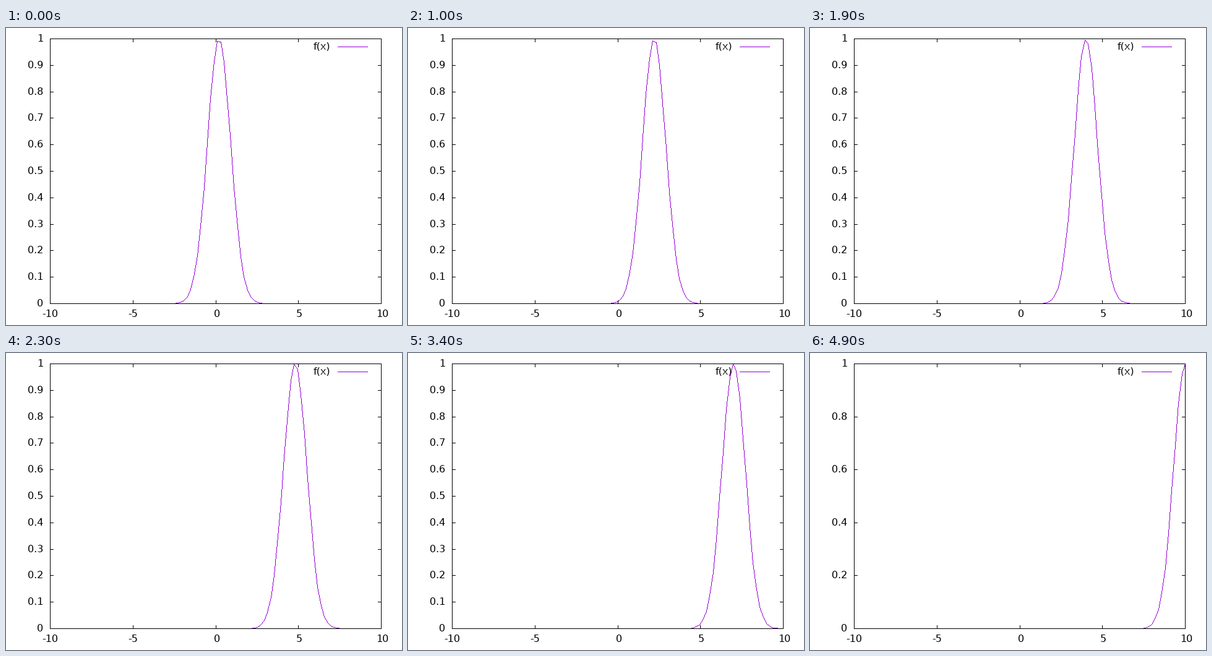
Write a matplotlib script that moves like this. It is 640 px wide and 480 px high and loops after 5 s.

```python
import matplotlib.pyplot as plt
import numpy as np
from matplotlib.animation import FuncAnimation
from matplotlib.collections import PolyCollection

WIDTH, HEIGHT, DPI = 640, 480, 100
LEFT, RIGHT, TOP, BOTTOM = 71, 606, 17, 445
FRAMES, INTERVAL = 50, 100
TICK = 5
VIOLET = "#9400d3"
SAMPLES = np.linspace(-10, 10, 100)
UNIT = np.array([(0, 0), (1, 0), (1, 1), (0, 1)])

plt.rcParams.update({
    "font.family": "DejaVu Sans",
    "font.size": 16 * 72 / DPI,
    "text.hinting": "default",
})

fig = plt.figure(figsize=(WIDTH / DPI, HEIGHT / DPI), dpi=DPI, facecolor="white")
ax = fig.add_axes((0, 0, 1, 1))
ax.set(xlim=(0, WIDTH), ylim=(HEIGHT, 0))
ax.axis("off")


def to_col(x):
    return np.floor(LEFT + (x + 10) / 20 * (RIGHT - LEFT) + 0.5).astype(int)


def to_row(y):
    return BOTTOM - np.floor(y * (BOTTOM - TOP) + 0.5).astype(int)


def segment(x0, y0, x1, y1):
    """Cells of a one-pixel line, stepped along its longer axis."""
    steep = abs(y1 - y0) > abs(x1 - x0)
    if steep:
        x0, y0, x1, y1 = y0, x0, y1, x1
    if x0 > x1:
        x0, y0, x1, y1 = x1, y1, x0, y0
    major, minor = x1 - x0, y1 - y0
    step = np.arange(major + 1)
    shift = (2 * step * abs(minor) + major) // max(2 * major, 1)
    cells = np.column_stack((x0 + step, y0 + np.sign(minor) * shift))
    return cells[:, ::-1] if steep else cells


def squares(segments):
    cells = np.unique(np.vstack([segment(*s) for s in segments]), axis=0)
    return cells[:, None, :] + UNIT


def strokes(segments, color, zorder):
    return ax.add_collection(PolyCollection(
        squares(segments), facecolors=color, edgecolors="none",
        linewidths=0, antialiaseds=False, zorder=zorder), autolim=False)


def label(x, row, text):
    return ax.text(x, row + 5, text, ha="left", va="baseline", color="black", zorder=1)


def y_tick(tenths):
    row = int(to_row(tenths / 10))
    whole = tenths % 10 == 0
    marks = strokes([(LEFT, row, LEFT + TICK, row),
                     (RIGHT - TICK, row, RIGHT, row)], "black", 3)
    return marks, label(50 if whole else 35, row, f"{tenths / 10:g}")


def x_tick(value, offset):
    col = int(to_col(value))
    strokes([(col, TOP, col, TOP + TICK),
             (col, BOTTOM - TICK, col, BOTTOM)], "black", 3)
    label(col - offset, BOTTOM + 17, str(value))


def curve(center):
    cols = to_col(SAMPLES)
    rows = to_row(np.exp(-(SAMPLES - center) ** 2))
    return squares(zip(cols[:-1], rows[:-1], cols[1:], rows[1:]))


strokes([(LEFT, TOP, RIGHT, TOP), (LEFT, BOTTOM, RIGHT, BOTTOM),
         (LEFT, TOP, LEFT, BOTTOM), (RIGHT, TOP, RIGHT, BOTTOM)], "black", 3)
for value, offset in ((-10, 13), (-5, 8), (0, 3), (5, 3), (10, 8)):
    x_tick(value, offset)
for tenths in range(0, 11, 2):
    y_tick(tenths)
odd_ticks = [artist for tenths in range(1, 10, 2) for artist in y_tick(tenths)]

label(497, 30, "f(x)")
strokes([(536, 30, 584, 30)], VIOLET, 2)
bell = strokes([(LEFT, BOTTOM, RIGHT, BOTTOM)], VIOLET, 2)


def update(frame):
    bell.set_verts(curve(0.2 * (frame + 1)))
    # The last step uses a coarser vertical scale.
    for artist in odd_ticks:
        artist.set_visible(frame < FRAMES - 1)
    return [bell, *odd_ticks]


anim = FuncAnimation(fig, update, frames=FRAMES, interval=INTERVAL,
                     repeat=True, repeat_delay=0)
plt.show()
```
